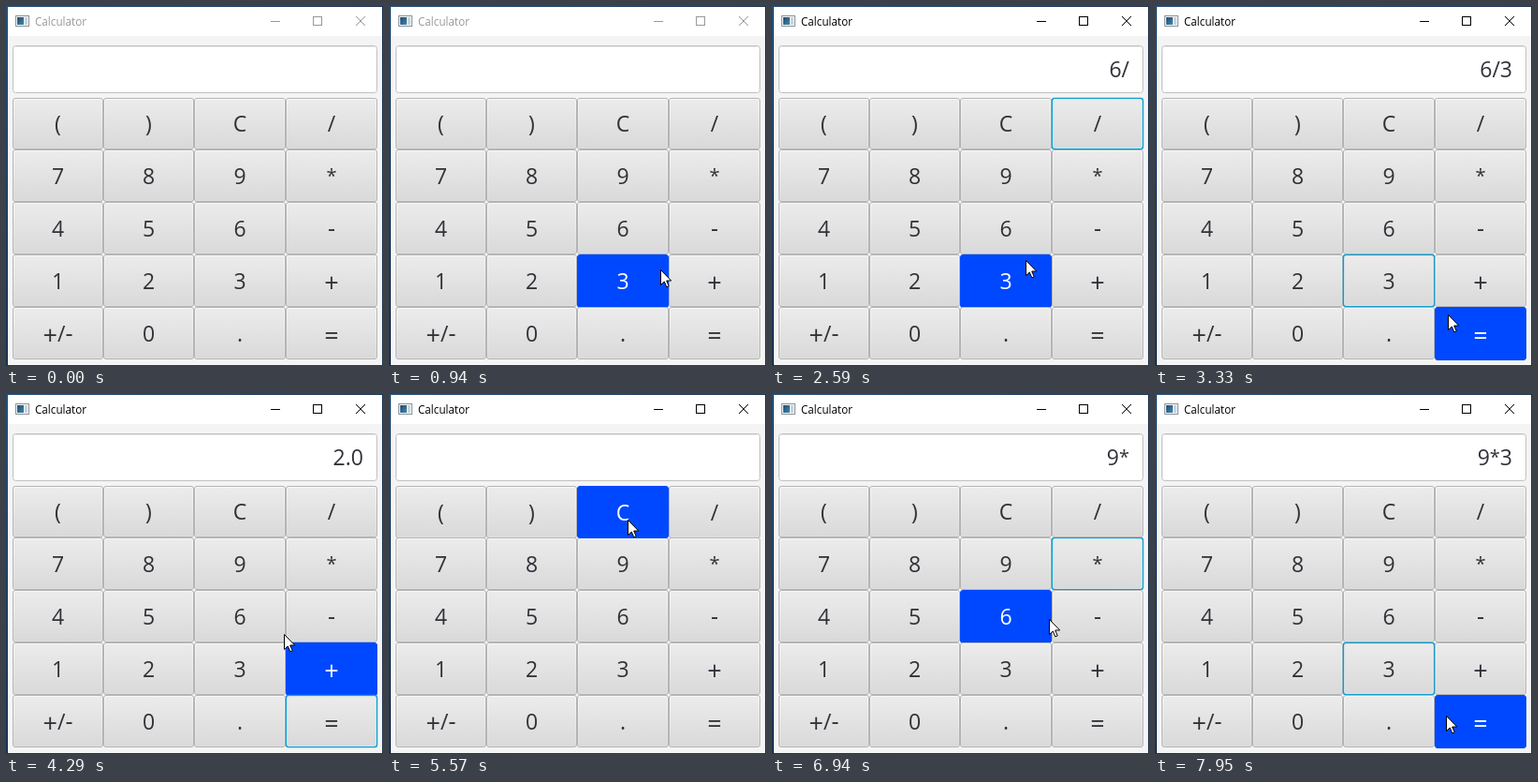
Animation of 403x384 px, one loop 8 s. Source, as an HTML page:

```html
<!DOCTYPE html>
<html lang="en">
<head>
<meta charset="utf-8">
<title>Calculator</title>
<style>
  html, body { margin: 0; width: 100%; height: 100%; overflow: hidden; }
  svg { display: block; width: 403px; height: 384px; }
  text { font-family: "Open Sans", "Noto Sans", sans-serif; font-size: 23px; fill: #303238; }
  #chrome { color: #999; }
  #chrome.active { color: #000; }
  #chrome path, #chrome rect { fill: none; stroke: currentColor; }
  #chrome text { font-size: 11.7px; fill: currentColor; }
  .key .face { fill: url(#face); stroke: #b4b4b4; }
  .key .shine { fill: none; stroke: url(#shine); }
  .key text { text-anchor: middle; }
  .key.focus .face { stroke: #129fd0; stroke-width: 1.6; }
  .key.focus .shine { stroke: #cfe4ec; }
  .key.hover .face { fill: #0048ff; stroke: #0048ff; stroke-width: 1; height: 56px; }
  .key.hover .shine { stroke: none; }
  .key.hover text { fill: #fff; }
  /* A hovered key in the top row makes that row one pixel taller */
  .stretch .top .face { height: 55px; }
  .stretch .top .shine { height: 53px; }
  .stretch .top text { transform: translateY(1px); }
</style>
</head>
<body>
<svg viewBox="0 0 403 384">
  <defs>
    <linearGradient id="face" x2="0" y2="1">
      <stop stop-color="#ececec"/><stop offset="1" stop-color="#d9d9d9"/>
    </linearGradient>
    <linearGradient id="shine" x2="0" y2="1">
      <stop stop-color="#f8f8f8"/><stop offset="1" stop-color="#dedede"/>
    </linearGradient>
    <linearGradient id="pane" x2="1" y2="1">
      <stop stop-color="#1f4a72"/><stop offset="1" stop-color="#4a86a8"/>
    </linearGradient>
    <linearGradient id="desk" x2="1" y2="1">
      <stop stop-color="#24507a"/><stop offset=".5" stop-color="#1b3352"/><stop offset="1" stop-color="#26394f"/>
    </linearGradient>
  </defs>
  <rect width="403" height="384" fill="url(#desk)"/>
  <rect x="2" y="1" width="400" height="382" fill="#f4f4f4"/>
  <rect x="2" y="1" width="400" height="31" fill="#fff"/>

  <rect x="10.5" y="10.5" width="14" height="11" fill="#f4f6f8" stroke="#8a949c"/>
  <rect x="12" y="12" width="7" height="8" fill="url(#pane)"/>
  <rect x="20" y="12" width="3" height="8" fill="#c9d3da"/>
  <g id="chrome">
    <text x="31" y="21">Calculator</text>
    <path d="M283 16.5h10M374 11l10 10M384 11l-10 10"/>
    <rect x="328.5" y="11.5" width="9" height="9"/>
  </g>

  <rect x="7.5" y="42.5" width="389" height="50" rx="3" fill="#fff" stroke="#c0c0c0"/>
  <path d="M9 43.5h386" stroke="#e6e6e6"/>
  <text id="display" x="382" y="75.5" text-anchor="end"></text>

  <g id="keys"></g>
  <path id="cursor" d="M.5 .5V16.5L4.3 13L6.8 18.8L9.2 17.8L6.7 12H11.7Z" fill="#fff" stroke="#000"/>
</svg>
<script>
const LOOP = 8000, STEP = 70, HOVER_LAG = 40;
const LABELS = [...'()C/789*456-123+', '+/-', ...'0.='];
const COLS = [7, 104, 201, 299, 397], TOP = 97, ROW = 56;

// Mouse trips: start and end time, destination, how sharply it slows down.
// Each trip ends in a click on the key below the pointer.
const HOME = { x: 335, y: 380 };
const TRIPS = [
  { start: 660, end: 1280, x: 270, y: 238, brake: 2 },
  { start: 1550, end: 1970, x: 326, y: 130, brake: 3.1 },
  { start: 2240, end: 2850, x: 267, y: 282, brake: 3.1 },
  { start: 3120, end: 3540, x: 328, y: 345, brake: 2 },
  { start: 4010, end: 4770, x: 255, y: 134, brake: 1.2 },
  { start: 5570, end: 5990, x: 262, y: 186, brake: 2 },
  { start: 6060, end: 6380, x: 321, y: 184, brake: 2 },
  { start: 6590, end: 7290, x: 270, y: 296, brake: 1 },
  { start: 7810, end: 8020, x: 318, y: 350, brake: 1.8 }
];

// Size and downward shift of the operator glyphs
const GLYPHS = { '+': [27, 2.5], '=': [27, 2.5], '*': [20, -2], '-': [25, 0] };

const $ = id => document.getElementById(id);

function glyphs(label) {
  let last = 0;
  return [...label].map(c => {
    const [size, shift] = GLYPHS[c] || [23, 0];
    const dy = shift - last;
    last = shift;
    return `<tspan style="font-size:${size}px" dy="${dy}">${c}</tspan>`;
  }).join('');
}

$('keys').innerHTML = LABELS.map((label, i) => {
  const col = i % 4, row = i >> 2;
  const x = COLS[col], w = COLS[col + 1] - x, base = TOP + ROW * row;
  const y = row ? base : base + 1, h = base + ROW - y;
  return `<g class="key ${row ? '' : 'top'}">
    <rect class="face" x="${x + .5}" y="${y + .5}" width="${w - 1}" height="${h - 1}" rx="2.5"/>
    <rect class="shine" x="${x + 1.5}" y="${y + 1.5}" width="${w - 3}" height="${h - 3}" rx="2"/>
    <text x="${x + w / 2}" y="${base + 37}">${glyphs(label)}</text></g>`;
}).join('');
const keys = [...$('keys').children];
$('keys').append(...keys.slice(0, 4));

function keyAt({ x, y }) {
  const col = COLS.findLastIndex(c => c <= x), row = Math.floor((y - TOP) / ROW);
  return col < 0 || col > 3 || row < 0 || row > 4 ? -1 : row * 4 + col;
}

function press(text, label) {
  if (label === 'C') return '';
  if (label !== '=') return text + label;
  const [a, op, b] = text.split(/([*/+-])/);
  const result = { '*': a * b, '/': a / b, '+': +a + +b, '-': a - b }[op];
  return result.toFixed(1);
}

// The pointer is redrawn once per step while it travels
function snap(t) {
  const trip = TRIPS.findLast(p => p.start <= t);
  if (!trip) return 0;
  if (t >= trip.end) return trip.end;
  return trip.start + Math.floor((t - trip.start) / STEP) * STEP;
}

function pointer(t) {
  const i = TRIPS.findLastIndex(p => p.start <= t);
  if (i < 0) return HOME;
  const from = TRIPS[i - 1] || HOME, to = TRIPS[i];
  const u = Math.min(1, (t - to.start) / (to.end - to.start));
  const k = 1 - (1 - u) ** to.brake;
  return { x: from.x + (to.x - from.x) * k, y: from.y + (to.y - from.y) * k };
}

function draw(t) {
  const at = snap(t), { x, y } = pointer(at);
  const visible = t >= TRIPS[0].start;
  const hover = visible ? keyAt(pointer(at - HOVER_LAG)) : -1;
  const clicked = TRIPS.filter(p => p.end + STEP <= t).map(keyAt);
  const focus = clicked.at(-1);

  $('chrome').classList.toggle('active', clicked.length > 0);
  $('cursor').setAttribute('visibility', visible ? 'visible' : 'hidden');
  $('cursor').setAttribute('transform', `translate(${Math.round(x)} ${Math.round(y)})`);
  $('keys').classList.toggle('stretch', hover >= 0 && hover < 4);
  keys.forEach((key, i) => {
    key.classList.toggle('hover', i === hover);
    key.classList.toggle('focus', i === focus);
  });
  $('display').innerHTML = glyphs(clicked.reduce((text, i) => press(text, LABELS[i]), ''));
}

const begin = performance.now();
function tick() {
  draw((performance.now() - begin) % LOOP);
  requestAnimationFrame(tick);
}
tick();
</script>
</body>
</html>
```
